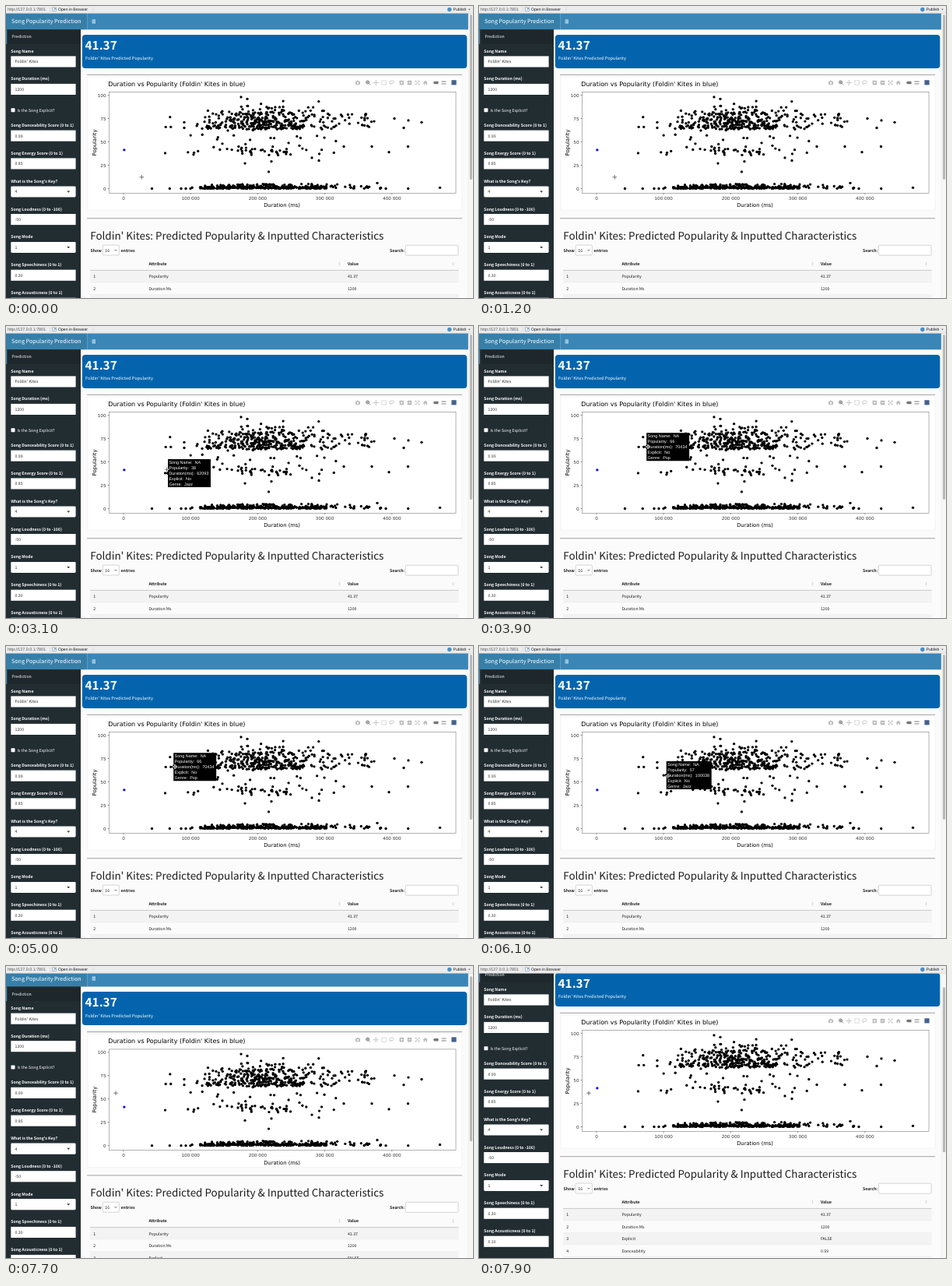
An HTML page that plays this animation: 600x375 px, repeating every 8000 ms.

```html
<!DOCTYPE html>
<html lang="en">
<head>
<meta charset="utf-8">
<title>Song Popularity Prediction</title>
<style>
  html, body { margin: 0; height: 100%; overflow: hidden; background: #fbfbfb; }
  svg { display: block; width: 100vw; height: 100vh; }
  text { white-space: pre; text-rendering: geometricPrecision; }
  .ui { font-family: "Noto Sans CJK JP", "Noto Sans CJK SC", "Noto Sans CJK", "Open Sans", sans-serif; }
  .plot { font-family: "DejaVu Sans", sans-serif; }
  .tip { font-family: "Liberation Sans", Arial, sans-serif; }
</style>
</head>
<body>
<svg id="stage" viewBox="0 0 600 375"></svg>
<script>
const LOOP = 8000, STEP = 100;
const SONG = "Foldin' Kites";
const BODY = 5.23, INK = '#1c1c1c';
const stage = document.getElementById('stage');

function add(parent, tag, attrs = {}) {
  const node = document.createElementNS('http://www.w3.org/2000/svg', tag);
  for (const key in attrs) node.setAttribute(key, attrs[key]);
  return parent.appendChild(node);
}
const group = parent => add(parent, 'g');
const rect = (parent, x, y, width, height, fill, more) =>
  add(parent, 'rect', { x, y, width, height, fill, ...more });
const path = (parent, d, stroke, width = 0.6, fill = 'none') =>
  add(parent, 'path', { d, stroke, 'stroke-width': width, fill });
// y is the middle of the capitals
function label(parent, x, y, content, size = BODY, fill = INK, more = {}) {
  const node = add(parent, 'text',
    { x, y: y + size * 0.365, 'font-size': size, fill, class: 'ui', ...more });
  node.textContent = content;
  return node;
}
const bold = { 'font-weight': 700 };
const centered = { class: 'plot', 'text-anchor': 'middle' };

const page = group(stage);
drawContent();
drawSidebar();
drawPlot();
drawTable();

const tooltip = group(stage);
const track = group(stage);
rect(track, 594, 9, 6, 366, '#f7f7f7');
path(track, 'M594 9V375', '#e4e4e4', 0.4);
const thumb = rect(track, 595.9, 11, 3.2, 212, '#b8b8b8', { rx: 1.6 });
drawViewerBar();

const cursor = group(stage);
path(cursor, 'M-3 0H3M0-3V3', '#fff', 1.6);
path(cursor, 'M-2.8 0H2.8M0-2.8V2.8', '#555', 0.8);

function drawContent() {
  rect(page, 0, 9, 600, 430, '#fbfbfb');
  rect(page, 104.3, 9, 489.7, 21.3, '#3a86b7');
  path(page, 'M110.6 18H115M110.6 19.9H115M110.6 21.8H115', '#fff', 0.9);
  rect(page, 97.9, 36.9, 494.4, 43, '#0364ad', { rx: 4 });
  label(page, 101.6, 50, '41.37', 15.3, '#fff', bold);
  label(page, 102, 67.3, SONG + ' Predicted Popularity', 5.6, '#fff');
}

function drawSidebar() {
  rect(page, 0, 30, 96, 400, '#222d32');
  rect(page, 0, 9, 104.3, 21.3, '#367fa9');
  rect(page, 0, 30.3, 96, 18.5, '#1e282c');
  rect(page, 0, 30.3, 1.25, 18.5, '#3c8dbc');
  label(page, 6.9, 19.8, 'Song Popularity Prediction', 7.2, '#fff', { 'font-weight': 300 });
  label(page, 7.6, 39.5, 'Prediction', BODY, '#fff');

  const fields = [
    [58, 'Song Name', SONG],
    [93.5, 'Song Duration (ms)', '1200'],
    [153.2, 'Song Danceability Score (0 to 1)', '0.99'],
    [189, 'Song Energy Score (0 to 1)', '0.85'],
    [225, "What is the Song's Key?", '4', true],
    [260.6, 'Song Loudness (0 to -100)', '-50'],
    [296.5, 'Song Mode', '1', true],
    [332.3, 'Song Speechiness (0 to 1)', '0.30'],
    [368.3, 'Song Acousticness (0 to 1)', '0.10']
  ];
  for (const [y, name, value, isSelect] of fields) {
    label(page, 6.2, y, name, BODY, '#fff', bold);
    rect(page, 6.3, y + 6.4, 83.3, 14.1, '#fff', { rx: isSelect ? 1.4 : 0 });
    label(page, 11.5, y + 13.5, value, BODY, '#2c2c2c');
    if (isSelect) path(page, `M78.2 ${y + 12.6}h4l-2 2.2z`, 'none', 0, '#333');
  }
  rect(page, 6.5, 131.3, 5, 5, '#fff', { rx: 0.8 });
  label(page, 14.6, 133.6, 'Is the Song Explicit?', BODY, '#fff');
}

function toPlot(duration, popularity) {
  return [151 + duration * 86.2 / 1e5, 234.5 - popularity * 1.2];
}

function drawPlot() {
  rect(page, 105, 91, 481, 171, '#fff', { stroke: '#eee', 'stroke-width': 0.6 });
  path(page, 'M104 88.3H586M104 272.7H586', '#b3b3b7', 1.3);
  label(page, 131.3, 99.6, `Duration vs Popularity (${SONG} in blue)`, 8.04, '#000', { class: 'plot' });
  drawModebar();

  rect(page, 132.3, 110.7, 445.7, 129.8, '#fff', { stroke: '#666', 'stroke-width': 0.5 });
  for (let i = 0; i <= 4; i++) {
    const [x, y] = toPlot(i * 1e5, i * 25);
    path(page, `M${x} 240.5v1.6M132.3 ${y}h-1.6`, '#333');
    label(page, x, 246.6, i ? i + '00 000' : '0', 5.7, '#333', centered);
    label(page, 128.6, y, i * 25, 5.7, '#333', { class: 'plot', 'text-anchor': 'end' });
  }
  label(page, 354.6, 256, 'Duration (ms)', 6.75, '#000', centered);
  label(page, 0, 0, 'Popularity', 6.75, '#000', { ...centered, transform: 'translate(113.3 175.5) rotate(-90)' });
  drawPoints();
}

function drawPoints() {
  let seed = 20;
  const random = () => (seed = seed * 16807 % 2147483647) / 2147483647;
  const bell = () => random() + random() + random() + random() - 2;
  const dot = (x, popularity, fill = '#000') =>
    add(page, 'circle', { cx: x, cy: 234.5 - popularity * 1.2, r: 1.65, fill });
  const scatter = (count, place) => {
    for (let i = 0; i < count; i++) dot(...place());
  };
  scatter(95, () => [345 + bell() * 78, 63.5 + random() * 5]);
  scatter(170, () => [332 + bell() * 58, 72 + bell() * 7]);
  scatter(60, () => [338 + bell() * 64, 79 + random() * random() * 16]);
  scatter(38, () => [370 + random() * 105, 64 + random() * 17]);
  scatter(16, () => [254 + random() * 40, 64 + random() * 20]);
  scatter(48, () => [335 + bell() * 70, 40.5 + bell() * 4]);
  scatter(18, () => [338 + bell() * 80, 47 + random() * 16]);
  scatter(230, () => [249 + random() * 164, random() * 1.8]);
  scatter(100, () => [332 + bell() * 78, 1 + random() * 4]);
  scatter(22, () => [410 + random() * 72, random() * 2.5]);

  const outliers = [
    [187.5, 0], [210.3, 0], [225, 0], [231, 0], [237, 0], [204.5, 38], [205.2, 66],
    [210.8, 76.5], [211.7, 66], [229, 71], [229, 65], [237.2, 57], [241.6, 38.5],
    [246, 69], [302, 98], [310, 96], [307, 27], [337.5, 18], [341, 29], [393, 33],
    [402, 30], [434, 45], [470, 45], [492, 39], [516.5, 45], [473, 72], [499, 75],
    [511, 65], [517, 73], [534, 71], [477, 6], [488, 0], [516.7, 0], [557.5, 1]
  ];
  for (const point of outliers) dot(...point);
  dot(151.9, 41.4, '#00f');
}

function drawModebar() {
  const gray = '#bbb', dark = '#777';
  rect(page, 449, 96.7, 6, 4.3, gray, { rx: 0.7 });
  rect(page, 450.8, 95.8, 2.4, 1.4, gray);
  add(page, 'circle', { cx: 452, cy: 98.9, r: 1.2, fill: '#fff' });
  add(page, 'circle', { cx: 464.6, cy: 97.9, r: 2, fill: 'none', stroke: dark, 'stroke-width': 1 });
  path(page, 'M466 99.3l2 2M463.5 97.9h2.2M464.6 96.8v2.2', dark, 0.9);
  path(page, 'M472.3 98.5h6M475.3 95.5v6M474.3 96.5l1-1 1 1M474.3 100.5l1 1 1-1M473.3 97.5l-1 1 1 1M477.3 97.5l1 1-1 1', gray, 0.7);
  rect(page, 482.8, 95.8, 5.6, 5.4, 'none', { stroke: gray, 'stroke-width': 0.8, 'stroke-dasharray': '1.2 .6' });
  path(page, 'M493.6 101.2C494.5 99.6 491.5 98.8 493 97C495 95.2 498.8 95.8 498.2 98C497.6 99.8 495 99.8 493.4 99.2', gray, 0.8);
  for (const [x, sign] of [[508.3, 'M506.8 98.5h3M508.3 97v3'], [518.5, 'M517 98.5h3']]) {
    rect(page, x - 2.7, 95.8, 5.4, 5.4, gray, { rx: 0.4 });
    path(page, sign, '#fff', 0.8);
  }
  path(page, 'M526 96l5.2 5M531.2 96l-5.2 5M526 97.5V96h1.5M529.7 96h1.5v1.5M531.2 99.5V101h-1.5M527.5 101H526v-1.5', gray, 0.8);
  path(page, 'M535.7 98.6l3.1-2.9 3.1 2.9h-.9v2.6h-1.5v-1.8h-1.4v1.8h-1.5v-2.6z', 'none', 0, gray);
  path(page, 'M548.7 98.5l1.8-1.7h5v3.4h-5z', 'none', 0, dark);
  path(page, 'M559.5 97h6M559.5 99.8h6', gray, 1.8);
  rect(page, 572.4, 95.2, 6.2, 6.2, '#44618f');
}

function drawTable() {
  label(page, 108.2, 295, SONG + ': Predicted Popularity & Inputted Characteristics', 13.45);
  label(page, 108.4, 313.6, 'Show', BODY, INK, bold);
  rect(page, 124.3, 307, 21, 13, '#fff', { rx: 1.2, stroke: '#aaa', 'stroke-width': 0.5 });
  label(page, 127.3, 313.6, '16');
  path(page, 'M139.4 312.8l1.5 1.5 1.5-1.5', '#333', 0.7);
  label(page, 147.5, 313.6, 'entries', BODY, INK, bold);
  label(page, 493, 313.9, 'Search:', BODY, INK, bold);
  rect(page, 513.4, 307.2, 67.6, 13, '#fff', { rx: 1.2, stroke: '#aaa', 'stroke-width': 0.5 });

  label(page, 183.4, 331, 'Attribute', BODY, INK, bold);
  label(page, 438.9, 331, 'Value', BODY, INK, bold);
  for (const x of [428.5, 574.5])
    path(page, `M${x - 1.2} 330.4h2.4l-1.2-2zM${x - 1.2} 331.6h2.4l-1.2 2z`, 'none', 0, '#ccc');

  const rows = [['Popularity', '41.37'], ['Duration Ms', '1200'], ['Explicit', 'FALSE'], ['Danceability', '0.99']];
  rows.forEach(([name, value], i) => {
    const y = 347.4 + i * 15.5;
    rect(page, 108, y - 7.75, 473.5, 15.5, i % 2 ? '#fbfbfb' : '#f3f3f3');
    path(page, `M108 ${y + 7.75}H581.5`, '#ddd', 0.5);
    label(page, 112.3, y, i + 1);
    label(page, 183.4, y, name);
    label(page, 438.9, y, value);
  });
  path(page, 'M108 339.4H581.5', '#999', 0.5);
}

function drawViewerBar() {
  const plain = { class: 'tip' };
  rect(stage, 0, 0, 600, 9.4, '#ececec');
  path(stage, 'M0 9.3H600', '#c4c4c4', 0.5);
  label(stage, 2, 4.4, 'http://127.0.0.1:7801', 5.35, '#555', plain);
  path(stage, 'M56.5 1.5V7.5M112 1.5V7.5', '#ccc', 0.5);
  rect(stage, 59.3, 2, 5, 4.6, '#fff', { stroke: '#7d8fa3', 'stroke-width': 0.6 });
  path(stage, 'M61 5.2l2.3-2M62 3h1.4v1.4', '#3a76b5', 0.7);
  label(stage, 67, 4.4, 'Open in Browser', 5.1, '#111', plain);
  add(stage, 'circle', { cx: 569.8, cy: 4.5, r: 2.7, fill: '#4a90c6' });
  label(stage, 574.5, 4.4, 'Publish', 5.15, '#111', plain);
  path(stage, 'M594 3.7h2.6l-1.3 1.6z', 'none', 0, '#555');
}

const hovers = [
  { from: 1900, to: 3300, popularity: 38, duration: 62093, genre: 'Jazz' },
  { from: 3300, to: 5400, popularity: 66, duration: 70434, genre: 'Pop' },
  { from: 5400, to: 6800, popularity: 57, duration: 100038, genre: 'Jazz' }
];
for (const hover of hovers) {
  const [x, y] = toPlot(hover.duration, hover.popularity);
  hover.node = group(tooltip);
  const width = 39.7 + 3.05 * String(hover.duration).length;
  path(hover.node, `M${x + 0.6} ${y}l2.9-2.5v-15.5h${width}v36h-${width}v-15.5z`, 'none', 0, '#000');
  const lines = ['Song Name:  NA', 'Popularity:  ' + hover.popularity,
    'Duration(ms):  ' + hover.duration, 'Explicit:  No', 'Genre:  ' + hover.genre];
  lines.forEach((line, i) =>
    label(hover.node, x + 4.9, y + (i - 2) * 7.04, line, 5.42, '#fff', { class: 'tip' }));
}

// [time, x, y] of the pointer
const route = [
  [0, 174.3, 219.8], [1300, 174.3, 219.8], [2000, 203, 194.5], [2900, 203, 194.5],
  [3500, 217, 155], [5100, 217, 155], [5600, 242.5, 167], [6500, 242.5, 167],
  [7200, 141, 163.2], [LOOP, 141, 163.2]
];
function pointerAt(t) {
  const i = route.findIndex(stop => stop[0] > t);
  const [t0, x0, y0] = route[i - 1], [t1, x1, y1] = route[i];
  const u = (t - t0) / (t1 - t0), ease = u * u * (3 - 2 * u);
  return [x0 + (x1 - x0) * ease, y0 + (y1 - y0) * ease];
}

function render(now) {
  const t = Math.floor(now % LOOP / STEP) * STEP;
  const scroll = 28 * Math.max(0, (t - 7600) / 300) ** 1.82;
  page.setAttribute('transform', `translate(0 ${-scroll})`);
  thumb.setAttribute('y', 11 + scroll * 0.58);
  for (const { from, to, node } of hovers)
    node.setAttribute('visibility', t >= from && t < to ? 'visible' : 'hidden');
  cursor.setAttribute('transform', `translate(${pointerAt(t)})`);
}

const start = performance.now();
function tick() {
  render(performance.now() - start);
  requestAnimationFrame(tick);
}
tick();
</script>
</body>
</html>
```
